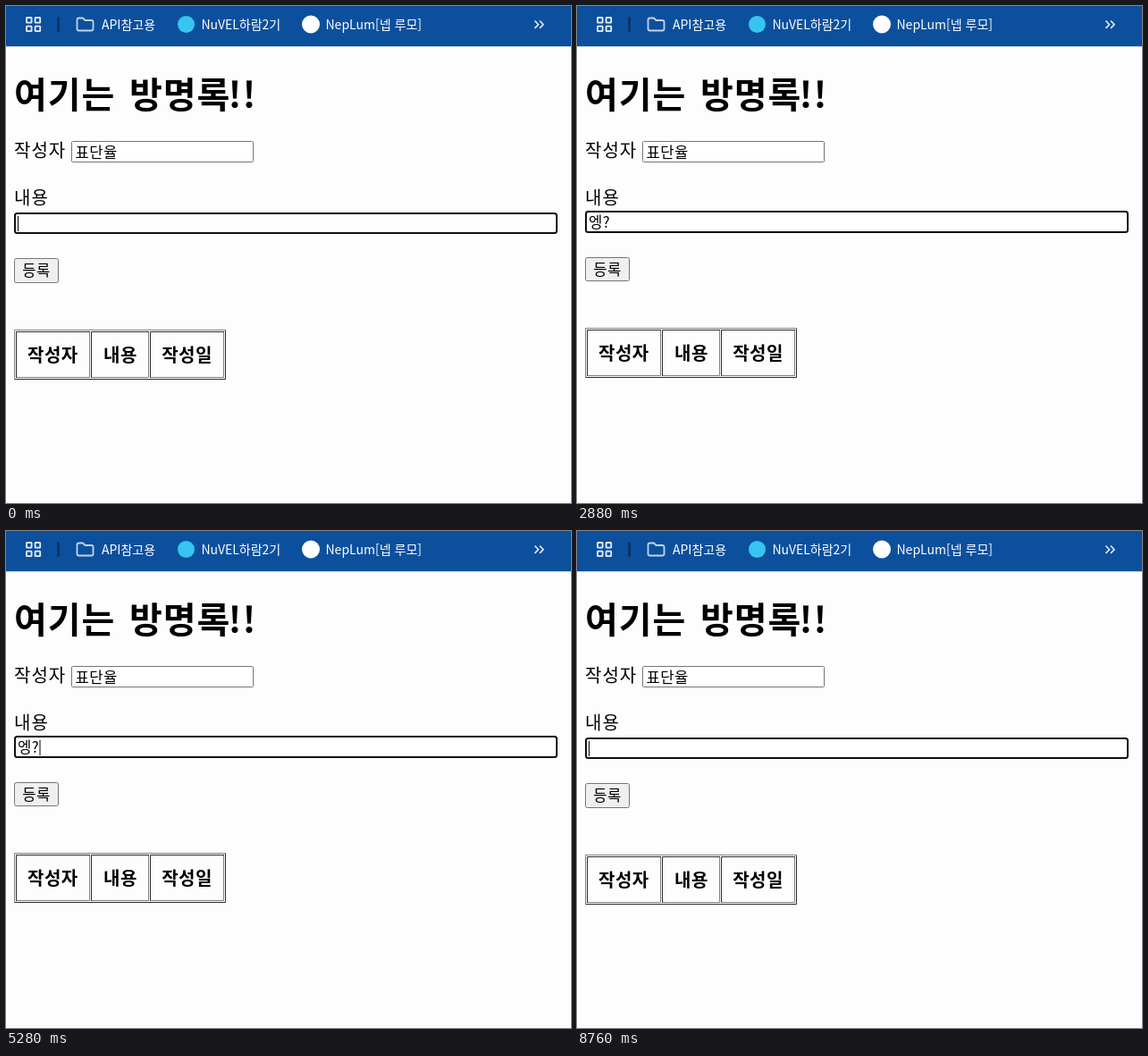
An HTML page that plays this animation: 632 px wide and 556 px high, repeating every 8.88 s.

```html
<!DOCTYPE html>
<html lang="ko">
<head>
<meta charset="utf-8">
<title>방명록</title>
<style>
  html, body { margin: 0; height: 100%; overflow: hidden; background: #fdfdfd; }
  svg { display: block; }
  text {
    font-family: "Noto Sans CJK KR", "Noto Sans CJK JP", "Noto Sans CJK", sans-serif;
    font-size: 20px; font-weight: 350; letter-spacing: .05em; white-space: pre;
  }
  .title { font-size: 40px; font-weight: 700; letter-spacing: .025em; }
  .head { font-weight: 700; letter-spacing: .025em; }
  .field { font-size: 16.67px; font-weight: 400; letter-spacing: .025em; }
  .date { font-size: 19px; letter-spacing: 0; }
  .bar text { font-size: 14px; font-weight: 400; letter-spacing: 0; fill: #fff; }
  .icon { fill: none; stroke: #e6edf6; stroke-width: 1.8; }
</style>
</head>
<body>
<svg width="632" height="556" viewBox="0 0 632 556">
  <g class="bar">
    <rect width="632" height="45" fill="#0c509d"/>
    <rect y="45" width="632" height="1" fill="#cfdae8"/>
    <g class="icon">
      <rect x="23" y="13" width="5.6" height="5.6" rx=".6"/>
      <rect x="32.6" y="13" width="5.6" height="5.6" rx=".6"/>
      <rect x="23" y="22.6" width="5.6" height="5.6" rx=".6"/>
      <rect x="32.6" y="22.6" width="5.6" height="5.6" rx=".6"/>
      <path d="M79.5 15.5q0-2 2-2h4.5l2.5 2.5h7q2 0 2 2v7.5q0 2-2 2h-14q-2 0-2-2z" stroke="#c5d2e4"/>
      <path d="M591.5 16.5l4 4.2-4 4.2M597 16.5l4 4.2-4 4.2" stroke-width="1.6"/>
    </g>
    <rect x="57" y="12" width="3" height="17" rx="1.5" fill="#073468"/>
    <circle cx="201.5" cy="20.5" r="9.5" fill="#36c5f0"/>
    <circle cx="341" cy="20.5" r="10" fill="#fff"/>
    <text x="107" y="25.5">API참고용</text>
    <text x="218.5" y="25.5">NuVEL하람2기</text>
    <text x="357.5" y="25.5">NepLum[넵 루모]</text>
  </g>
  <text class="title" y="113.5"><tspan x="9">여기는</tspan> <tspan x="138">방명록</tspan><tspan x="248.5">!!</tspan></text>
  <text x="9" y="168.7">작성자</text>
  <g id="page"></g>
</svg>
<script>
const STEP = 120, STEPS = 74;
const AUTHOR = '표단율';
const page = document.getElementById('page');

const text = (x, y, s, cls = '', anchor = 'start') =>
  `<text x="${x}" y="${y}" class="${cls}" text-anchor="${anchor}">${s}</text>`;

const box = (x, y, w, h, { fill = '#fff', stroke = '#767676', line = 1, r = 1 } = {}) =>
  `<rect x="${x + line / 2}" y="${y + line / 2}" width="${w - line}" height="${h - line}" rx="${r}"
    fill="${fill}" stroke="${stroke}" stroke-width="${line}"/>`;

const bar = (x, y, w, h) => `<rect x="${x}" y="${y}" width="${w}" height="${h}"/>`;

// One-pixel bevel: top and left in one shade, bottom and right in the other
const bevel = (x, y, w, h, a, b) =>
  `<g fill="none"><path d="M${x + .5} ${y + h}V${y + .5}H${x + w}" stroke="${a}"/>
   <path d="M${x + 1} ${y + h - .5}H${x + w - .5}V${y + 1}" stroke="${b}"/></g>`;

function table(y, row) {
  const right = row ? 297 : 244;
  const edges = [11, 95, 161, right + 1];
  const rows = row ? 2 : 1;
  const headY = y + 35.6, rowY = y + 89;
  let out = bevel(9, y, right - 7, rows * 53 + 3, '#808080', '#2c2c2c');
  for (let r = 0; r < rows; r++)
    for (let c = 0; c < 3; c++)
      out += bevel(edges[c], y + 2 + r * 53, edges[c + 1] - edges[c] - 1, 52, '#2c2c2c', '#808080');
  out += text(24, headY, '작성자', 'head') + text(109, headY, '내용', 'head')
       + text((161 + right) / 2, headY, '작성일', 'head', 'middle');
  if (row)
    out += text(24, rowY, AUTHOR) + text(109, rowY, row) + text(173.5, rowY, '2024. 11. 13.', 'date');
  return out;
}

function draw(k) {
  const sent = k >= 33;
  const pressed = k === 32;
  const hover = k >= 30;
  const composing = k >= 13 && k < 19;
  const typed = k < 13 || sent ? '' : k < 14 ? 'ㅇ' : k < 16 ? '에' : k < 19 ? '엥' : '엥?';
  const caretOn = composing || (k < 13 ? k + 2 : k - 19) % 8 < 4;
  const focused = k < 32;

  // Empty fields are slightly taller or lower than filled ones
  const [inputY, inputH, buttonY, buttonH, tableY] =
    sent ? [232, 25, 284, 27, 363] : typed ? [229, 25, 281, 27, 360] : [231, 24, 282, 28, 362];

  let out = box(73, sent ? 152 : 151, 204, sent ? 25 : 24);
  if (!sent) out += text(77.5, 169.6, AUTHOR, 'field');
  out += text(9, sent ? 223.6 : 221.6, '내용');
  out += box(9, inputY, 608, inputH, focused ? { stroke: '#101010', line: 2, r: 2.5 } : {});
  out += text(13, inputY + 18.5, typed, 'field');
  if (composing) out += bar(14, inputY + 21, 15, 1);
  if (focused && caretOn)
    out += bar(composing ? 28.5 : typed ? 37.5 : 13, inputY + (typed ? 5 : 4), 1, 17);

  const [fill, stroke] =
    pressed ? ['#f5f5f5', '#8d8d8d'] : hover ? ['#e5e5e5', '#4f4f4f'] : ['#efefef', '#767676'];
  out += box(9, buttonY, 50, buttonH, { fill, stroke, r: 2 });
  out += text(34, buttonY + 20, '등록', 'field', 'middle');
  page.innerHTML = out + table(tableY, sent && '엥?');
}

// The scene plays forwards, then backwards
let last = -1;
function tick() {
  const i = Math.floor(performance.now() / STEP) % STEPS;
  const k = Math.min(i, STEPS - 1 - i);
  if (k !== last) draw(last = k);
  requestAnimationFrame(tick);
}
tick();
</script>
</body>
</html>
```
